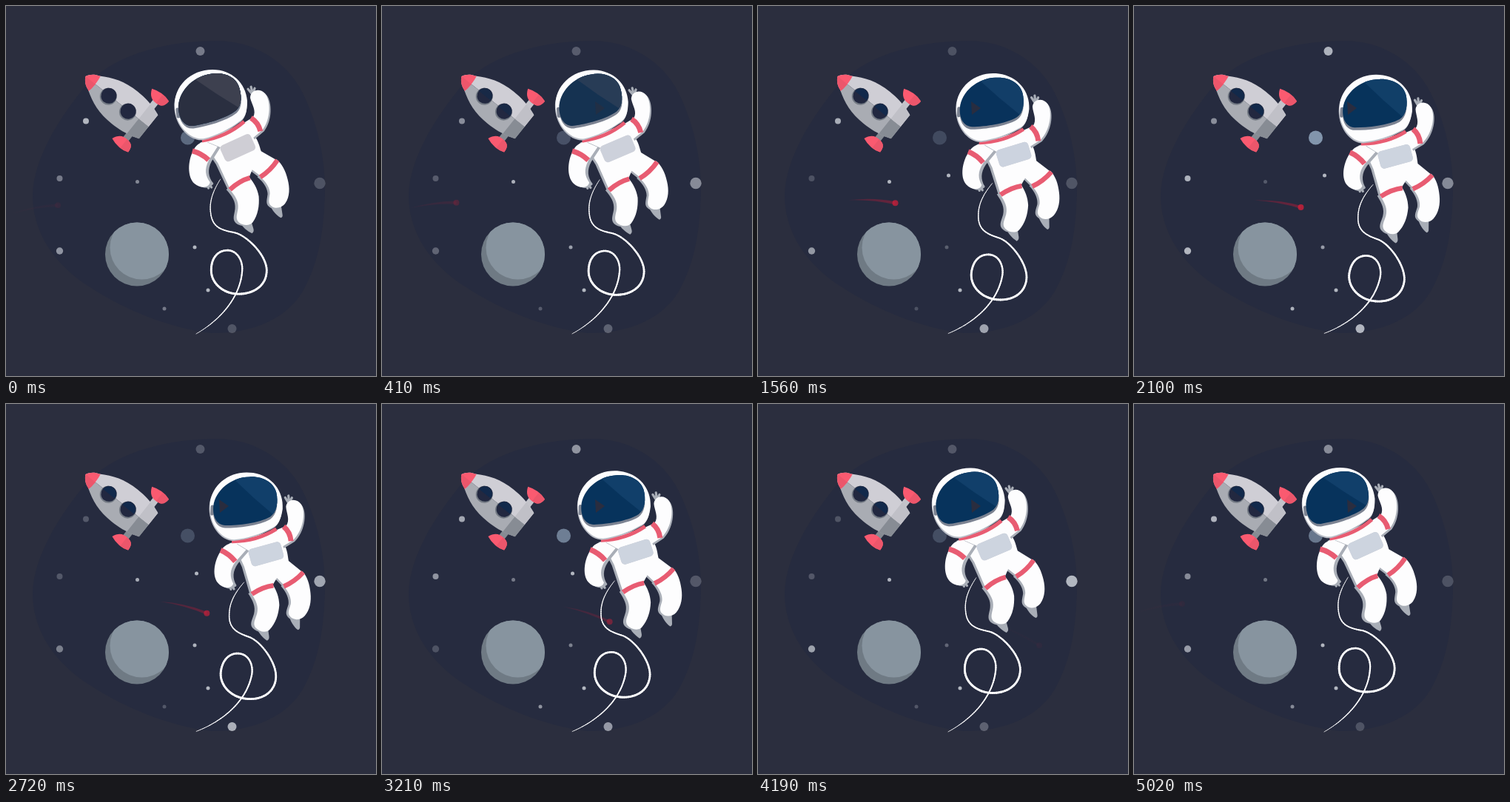
An HTML page with a canvas that plays this animation: 500 px wide and 500 px high, repeating every 5090 ms.

```html
<!DOCTYPE html>
<html lang="en">
<head>
<meta charset="utf-8">
<title>Astronaut</title>
<style>
html, body { margin: 0; width: 100%; height: 100%; overflow: hidden; background: #2b2e3e; }
canvas { display: block; width: 500px; height: 500px; }
</style>
</head>
<body>
<canvas id="stage" width="500" height="500"></canvas>
<script>
const ctx = document.getElementById('stage').getContext('2d');
const LOOP = 5090;
const TAU = Math.PI * 2;
const WHITE = '#fdfdfe';
const SHADE = '#a9aeb7';
const RED = '#e85c72';

// 0 to 1 and back once per cycle, highest at the given share of the cycle
const wave = (turns, peak) => (1 + Math.cos(TAU * (turns - peak))) / 2;

function fill(d, color, dx = 0, dy = 0) {
  ctx.save();
  ctx.translate(dx, dy);
  ctx.fillStyle = color;
  ctx.fill(new Path2D(d));
  ctx.restore();
}

function stroke(d, color, width, cap = 'butt') {
  ctx.strokeStyle = color;
  ctx.lineWidth = width;
  ctx.lineCap = cap;
  ctx.stroke(new Path2D(d));
}

function rect(x, y, w, h, color) {
  ctx.fillStyle = color;
  ctx.fillRect(x, y, w, h);
}

function dot(x, y, r, color) {
  ctx.fillStyle = color;
  ctx.beginPath();
  ctx.arc(x, y, r, 0, TAU);
  ctx.fill();
}

function clipped(d, draw) {
  ctx.save();
  ctx.clip(new Path2D(d));
  draw();
  ctx.restore();
}

function faded(alpha, draw) {
  ctx.globalAlpha = alpha;
  draw();
  ctx.globalAlpha = 1;
}

function drawSky() {
  rect(0, 0, 500, 500, '#2b2e3e');
  fill('M285 47C338 47 384 78 404 124C422 164 431 205 431 250C430 295 425 340 404 380' +
    'C382 424 330 443 278 442C226 437 160 411 112 379C66 350 36 306 36 256' +
    'C37 207 72 150 110 105C152 62 224 47 285 47Z', '#262b3f');
}

// A star pulses a whole number of times per loop; zero pulses is steady
function star(x, y, r, pulses, peak, t, color = '#e4e8ee') {
  const level = 0.21 + 0.53 * wave(pulses * t / LOOP, peak);
  faded(level, () => dot(x, y, r, color));
}

function drawStars(t) {
  star(262.5, 61, 6, 4, 0.72, t);
  star(72.5, 233, 4, 4, 0.72, t);
  star(214, 409, 2.5, 4, 0.72, t);
  star(245.5, 178, 9.5, 4, 0.72, t, '#a8c0d8');
  star(177.5, 237.5, 2.5, 4, 0.24, t);
  star(108, 155.5, 4, 3, 0.02, t);
  star(424, 239.5, 7.7, 3, 0.47, t);
  star(72.5, 331, 4.7, 2, 0.8, t);
  star(255, 326, 2.5, 2, 0, t);
  star(305.5, 436, 6, 1, 0.45, t);
  star(273, 384, 2.5, 0, 0, t);
  star(257.5, 229, 2.5, 0, 0, t);
}

function drawPlanet() {
  ctx.save();
  ctx.beginPath();
  ctx.arc(177, 335.5, 43, 0, TAU);
  ctx.clip();
  rect(130, 290, 95, 95, '#6f7a84');
  dot(183.5, 326.5, 43, '#87949f');
  ctx.restore();
}

function drawMeteor(t) {
  const x = 70 + 0.074 * (t > 4900 ? t - LOOP : t);
  const y = px => 264 + 0.00108 * (px - 140) ** 2;
  const back = x - 63, mid = x - 30;
  faded(0.8 * wave(t / LOOP, 0.4), () => {
    const tail = ctx.createLinearGradient(back, 0, x, 0);
    tail.addColorStop(0, 'rgba(190,25,55,.3)');
    tail.addColorStop(1, 'rgba(190,25,55,.6)');
    ctx.fillStyle = tail;
    ctx.beginPath();
    ctx.moveTo(back, y(back) - 2);
    ctx.quadraticCurveTo(mid, y(mid) - 6, x, y(x) - 2);
    ctx.lineTo(x, y(x) + 2);
    ctx.quadraticCurveTo(mid, y(mid) - 3, back, y(back) - 2);
    ctx.fill();
    dot(x, y(x), 4, '#d0203a');
  });
}

const HULL = 'M0 0C3 -6 8 -10 14 -12C30 -22 45 -28 68 -28C80 -28 92 -26 99 -24L109 -20.5' +
  'L109 20.5L99 24C92 26 80 28 68 28C45 28 30 22 14 12C8 10 3 6 0 0Z';

function drawFin(side, strut) {
  ctx.save();
  ctx.scale(1, side);
  rect(91, 17, 9, 20, strut);
  const cap = 'M80.5 43Q95 49 109 44C109 36 106 32 99 31.5C90 30 84 34 80.5 43Z';
  fill(cap, '#fa5a70');
  clipped(cap, () => rect(97, 28, 15, 24, '#ec566b'));
  ctx.restore();
}

// "dull" fades the blue reflections out at the loop start
function drawRocket(dull) {
  ctx.save();
  ctx.translate(107.5, 95);
  ctx.rotate(38.7 * Math.PI / 180);
  drawFin(-1, '#c3c3ca');
  drawFin(1, '#868b93');
  clipped(HULL, () => {
    rect(0, -30, 110, 30, '#cfced5');
    rect(0, 0, 110, 30, '#a9acb3');
    rect(92, -30, 18, 30, '#c0c0c7');
    rect(92, 0, 18, 30, '#878c94');
    fill('M-2 -16L15 -16Q19 0 15 16L-2 16Z', '#fa5a70');
    fill('M-2 0L17 0Q17 8 15 16L-2 16Z', '#ec566b');
  });
  for (const x of [41, 74.5]) {
    dot(x, 2, 11.5, '#737a84');
    dot(x, 0.8, 10.6, '#222840');
    faded(1 - dull, () => {
      ctx.fillStyle = '#12294b';
      ctx.beginPath();
      ctx.arc(x, 0.8, 10, Math.PI, 0);
      ctx.fill();
    });
  }
  ctx.restore();
}

const rope = document.createElementNS('http://www.w3.org/2000/svg', 'path');
rope.setAttribute('d', 'M289 234C279 250 274 264 276 279C278 300 292 303 308 306' +
  'S352 336 352 357S334 389 314 389S277 375 277 357S287 330 299 330' +
  'S319 342 319 355C318 392 290 424 257 443');
const ropePoints = Array.from({ length: 161 },
  (_, i) => rope.getPointAtLength(rope.getTotalLength() * i / 160));

function drawRope() {
  ctx.strokeStyle = WHITE;
  ctx.lineCap = 'round';
  for (let i = 1; i < ropePoints.length; i++) {
    const a = ropePoints[i - 1], b = ropePoints[i];
    ctx.lineWidth = 0.7 + 2.2 * Math.sin(Math.PI * i / ropePoints.length);
    ctx.beginPath();
    ctx.moveTo(a.x, a.y);
    ctx.lineTo(b.x, b.y);
    ctx.stroke();
  }
}

function drawLegs() {
  const left = 'M301 247C309 256 314 263 313 273C312 281 309 287 314 292' +
    'C320 297 329 297 333 292C340 282 342 270 341 257C339 246 334 238 328 231Z';
  const right = 'M342 230C351 237 356 246 356 253C355 261 353 266 358 270' +
    'C364 275 373 272 377 266C383 257 383 245 380 234C377 222 372 213 365 207Z';
  fill('M355 267C359 276 365 283 371 286Q374 285 373 281L371 268Z', SHADE);
  fill('M315 291C319 299 326 304 332 307Q335 305 334 301L331 291Z', SHADE);
  fill(right, SHADE, -3, 1);
  fill(right, WHITE);
  fill(left, SHADE, -4, 1);
  fill(left, WHITE);
}

function drawBody(dull) {
  const torso = 'M264 184L322 157L334 174C340 181 342 190 344 196L365 208L344 230L332 221' +
    'L328 231L302 247L286 213L274 195Z';
  fill(torso, SHADE, -3, 1);
  fill(torso, WHITE);
  stroke('M302 248Q315 236 329 232', RED, 6.5);
  stroke('M343 231Q357 222 366 208', RED, 6.5);
  ctx.save();
  ctx.translate(312.5, 191.5);
  ctx.rotate(-0.43);
  ctx.beginPath();
  ctx.roundRect(-22.5, -12, 45, 24, 5);
  ctx.fillStyle = '#cfced5';
  ctx.fill();
  ctx.fillStyle = '#cdd4df';
  faded(1 - dull, () => ctx.fill());
  ctx.restore();
}

function drawArms() {
  const left = 'M252 196C245 209 244 231 254 240C262 247 274 246 275 238' +
    'C269 230 267 221 273 209L285 190L268 183C260 185 255 189 252 196Z';
  stroke('M272 236L278 240M271 238L277 245M270 239L273 246', SHADE, 3.2, 'round');
  fill(left, SHADE, 4, 1);
  fill(left, WHITE);
  stroke('M251 196Q263 199 273 208', RED, 7);
  const right = 'M320 158L333 150C338 141 331 133 329 124C329 113 342 110 349 118' +
    'C357 128 357 152 346 167L333 178Z';
  stroke('M331 118L326 112M332 117L330 109M333 117L335 111', SHADE, 3.2, 'round');
  fill(right, SHADE, 2, 2);
  fill(right, WHITE);
  stroke('M330 151Q340 157 343 169', RED, 7);
}

const VISOR = 'M232 139C231 117 250 96 274 92C292 88 308 95 313 107C318 119 318 134 310 141' +
  'C296 152 270 159 252 162C240 163 233 153 232 139Z';

function drawHelmet(angle, dull) {
  stroke('M264 182Q297 177 321 156', RED, 5);
  const shell = 'M227 137C225 108 249 86 278 86C304 86 323 104 325 128C325 142 323 151 314 156' +
    'C301 166 283 175 267 179C250 182 229 163 227 137Z';
  fill(shell, '#b9bdc6', -0.5, 2);
  fill(shell, WHITE);
  stroke('M231 140L232 149', '#7c8392', 5, 'round');
  fill(VISOR, '#7c8392', 0.5, 3.5);
  clipped(VISOR, () => {
    const pane = 'M220 80H330V180H220Z';
    const shine = 'M250 96L284 119L318 140L330 80L260 80Z';
    fill(pane, '#07335c');
    fill(shine, '#113f6a');
    faded(dull, () => {
      fill(pane, '#2b3041');
      fill(shine, '#3e4150');
    });
    // Dark glint that stays put while the visor moves
    pivot(-angle);
    faded(1 - dull, () => fill('M288 129L301 138L289 147Z', '#2a2d3f'));
  });
}

function pivot(angle) {
  ctx.translate(261, 444);
  ctx.rotate(angle);
  ctx.translate(-261, -444);
}

function drawAstronaut(t, dull) {
  const angle = 9.6 * wave(t / LOOP, 0.456) * Math.PI / 180;
  ctx.save();
  pivot(angle);
  drawRope();
  drawLegs();
  drawBody(dull);
  drawArms();
  drawHelmet(angle, dull);
  ctx.restore();
}

function render(now) {
  const t = now % LOOP;
  const dull = Math.exp(-t / 450);
  drawSky();
  drawStars(t);
  drawPlanet();
  drawRocket(dull);
  drawMeteor(t);
  drawAstronaut(t, dull);
}

const start = performance.now();
function loop() {
  render(performance.now() - start);
  requestAnimationFrame(loop);
}
loop();
</script>
</body>
</html>
```
